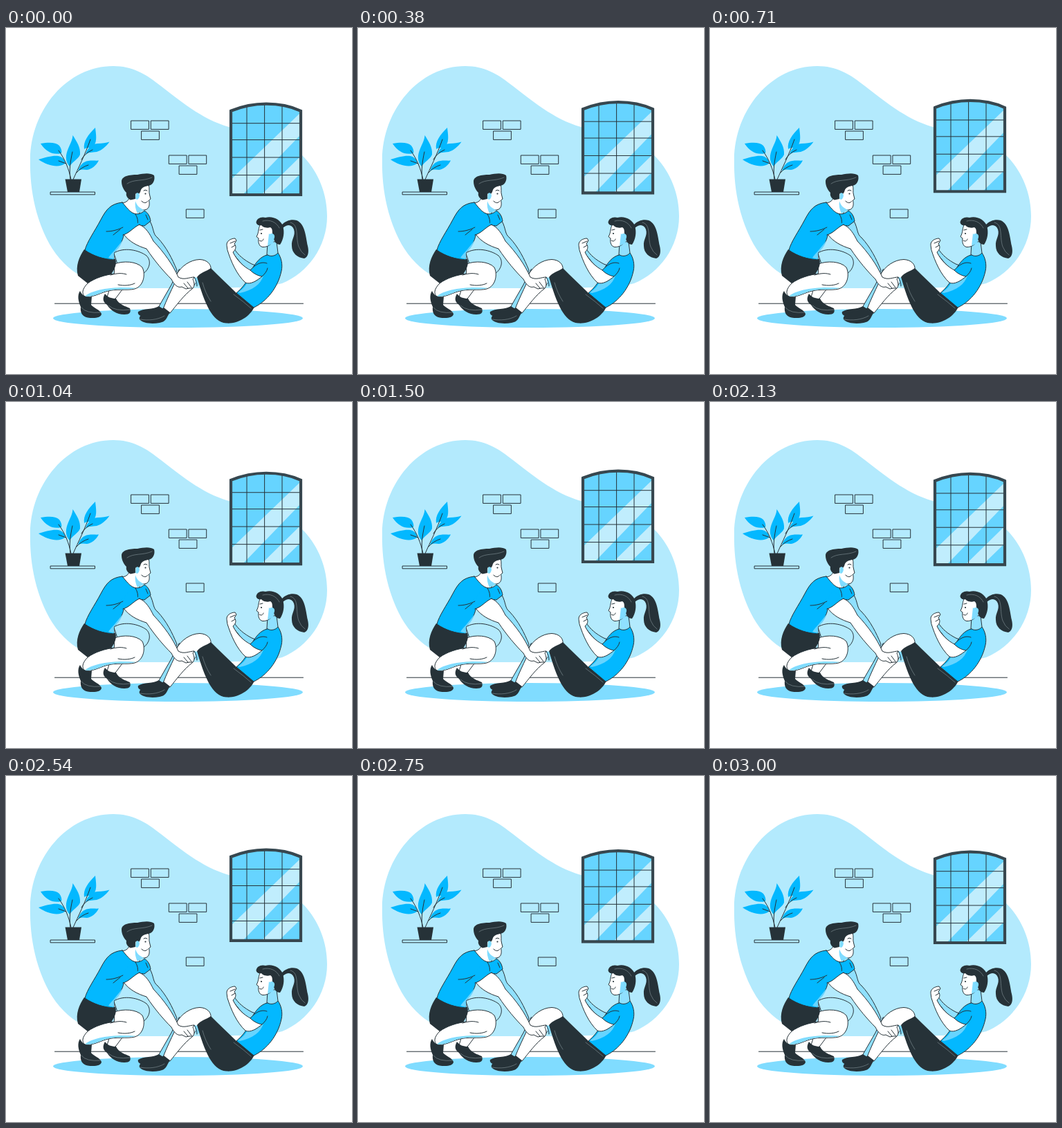
An HTML page that plays this animation: 500 px wide and 500 px high, repeating every 3040 ms.

```html
<!DOCTYPE html>
<html lang="en">
<head>
<meta charset="utf-8">
<title>Sit-up training</title>
<style>
html, body { margin: 0; width: 100%; height: 100%; overflow: hidden; background: #fff; }
svg { display: block; width: 100vw; height: 100vh; }
.line { fill: none; stroke: #263238; stroke-width: 1; stroke-linecap: round; stroke-linejoin: round; }
.dark { fill: #263238; }
.blue { fill: #03b8ff; }
.pale { fill: #b3eafd; }
.mid { fill: #80dcff; }
.fold { fill: #66d4ff; }
.skin, .shade, .tee { stroke: #263238; stroke-width: 1; stroke-linejoin: round; stroke-linecap: round; }
.skin { fill: #fff; }
.shade { fill: #8fe0ff; }
.tee { fill: #03b8ff; }
.seam { fill: none; stroke: #87959b; stroke-width: .6; stroke-linecap: round; }
</style>
</head>
<body>
<svg viewBox="0 0 500 500">
  <defs>
    <path id="pane" d="M325 119.8C343 112.5 358 109.7 376 109.7S410 112.5 426 119.8V241H325Z"/>
    <clipPath id="glass"><use href="#pane"/></clipPath>
  </defs>

  <path class="pale" d="M35 190C36 117 89 55 155 55C182 55 201 66 220 81C250 104 283 132 322 143C365 152 405 160 430 186C452 209 464 240 464 272C464 316 436 354 399 369C368 377 270 376 184 376C134 376 94 360 67 319C44 282 34 235 35 190Z"/>
  <ellipse class="mid" cx="248.5" cy="419.5" rx="180.5" ry="13.5"/>
  <path class="line" d="M70.5 398.2H429.5"/>
  <g id="bricks" class="line"></g>

  <g id="window">
    <g clip-path="url(#glass)">
      <use href="#pane" fill="#66d4ff"/>
      <path fill="#c0edfd" d="M325 219L427 121V153L342 241H325ZM369 241L427 184V209L394 241Z"/>
      <path class="line" d="M348 110V241M373.6 108V241M399 110V241M325 137.7H426M325 161.6H426M325 187H426M325 212.6H426"/>
    </g>
    <use href="#pane" fill="none" stroke="#37474f" stroke-width="4.2"/>
  </g>

  <!-- shelf and plant -->
  <path class="line" d="M64.5 237H128.5V240.8H64.5Z"/>
  <path class="blue" d="M80 181C68 184 58 179 50 167C62 165 72 165 77 170C80 174 81 178 80 181ZM85 196C77 202 61 200 47 190C60 186 72 183 79 186C84 189 86 193 85 196ZM92 200C85 193 86 183 90 174C93 167 96 162 96.5 155C102 164 108 172 107 183C104 190 97 192 92 200ZM113 175C111 164 119 154 129 144C130 154 132 163 127 170C123 174 117 172 113 175ZM115 183C117 174 124 168 132 167C139 167 145 166 149.500 164.500C144 172 138 177 131 179C124 180 119 179 115 183ZM104 207C106 199 111 193 119 192C125 191 130 192 134 191.500C130 199 124 204 117 205C111 204 107 204 104 207Z"/>
  <path class="line" d="M94 219C91 204 85 189 76 177M87 196L76 192M93 219C91 205 93 193 96 179M97 219C104 203 114 184 122 161M109 190Q114 181 125 176M102 209Q109 201 119 198"/>
  <path class="dark" d="M85.500 218.500H109L106 237H89Z"/>

  <!-- trainer, far side -->
  <path class="shade" style="fill:#b3eafd" d="M156 325C171 316 192 321 203 329C211 337 207 349 198 355L166 354Z"/>
  <path class="skin" d="M150 376L146 389C151 394 156 393 159 390L168 378Z"/>
  <path class="dark" d="M143 384C139 391 140 396 146 400C151 408 160 414 171 414C179 414 181 411 179 405C173 402 163 400 159 391C152 391 147 389 143 384Z"/>
  <path class="shade" d="M193 284L208 279C214 290 212 298 219 303C232 317 240 333 247 350L241 363C231 338 211 315 197 301Z"/>

  <!-- far leg of the athlete -->
  <path class="shade" d="M250 349L239 371L220 404L229 409L260 353Z"/>
  <path class="dark" d="M191 410C198 405 213 407 221 402L232 409L226 418L199 417C192 416 190 413 191 410Z"/>

  <!-- trainer, near side -->
  <path class="skin" d="M157 341C169 336 189 337 197 346C202 356 199 373 186 377C175 380 159 376 144 381C134 384 124 390 114 388C109 384 110 377 118 369C129 361 143 357 156 355Z"/>
  <path class="mid" d="M114 387.500C124 379 150 373 188 375.500C175 379.500 159 375.500 144 380.500C134 383.500 124 389.500 114 387.500Z"/>
  <path class="dark" d="M113 320L158 334C161 341 156 350 152 356C138 358 126 363 118 369L104 358C100 344 106 330 113 320Z"/>
  <path class="line" d="M151 357C161 354 168 354 174 356M162 371C171 373 180 372 186 369"/>
  <path class="dark" d="M107 380C103 386 104 394 108 403C107 411 110 417 118 418.500C127 420 138 419 138 413C136 407 127 405 123 400L124 388C117 390 111 388 107 380Z"/>
  <path class="seam" d="M109 404Q116 413 137 411M148 401Q158 410 179 407"/>

  <path class="skin" d="M178 244C178 249 174 252 168 253L179 268L192 270L196 257Z"/>
  <path class="skin" d="M187 230L206 226C208 232 206 237 207.500 241L209 247L206.500 249C208 255 207 261 202 262.500C196 264 190 262 187 258Z"/>
  <path class="skin" style="stroke:none" d="M180 246L190 246L193 261L186 264L178 256Z"/>
  <path class="mid" d="M187 250C189 257 194 261 200 263L190 268C187 262 186 256 187 250Z"/>
  <path class="dark" d="M167 222C167 214 178 212 190 212C199 210 209 209 214 213C216 220 212 227 206 228C201 229 196 229 194 237L192 240C188 237 185 240 187 247L180 248.500C175 246 173 242 174 238C170 234 167 228 167 222Z"/>
  <path class="mid" d="M188 239C193 236 195 244 190 248L187 247Z"/>
  <path class="seam" d="M175 225C185 218 197 222 211 216"/>
  <path class="line" d="M199 235Q201 233 204 235M196 250C199 254 203 253 205 250"/>
  <circle class="dark" cx="201.500" cy="239.500" r="1.1"/>

  <path class="tee" d="M168 252C151 254 145 262 137 277C128 294 117 309 114 321C127 330 141 334 156 335V325C163 316 169 308 170 299L192 285L200 286L209 279C208 272 205 267 200 264C196 268 190 270 185 268C179 266 174 259 168 252Z"/>
  <path class="fold" d="M148 332C153 325 161 317 168 307C166 316 160 321 156 325V334Z"/>
  <path class="line" d="M145 294C153 294 161 292 169 288M155 299L165 291M187 269Q192 277 190 284M202 270L205 277"/>

  <!-- athlete, legs -->
  <path class="skin" d="M246 357C253 344 266 335 280 334.500C291 335 297 342 296 349L278 361L269 377C257 386 247 400 237 412C232 412 229 409 227 406C232 393 238 381 244 368Z"/>
  <path class="mid" d="M272 360L277 361L279 371L275 374Z"/>
  <path class="dark" d="M276 360C281 353 289 352 296 347C309 360 321 371 333 383L359 403C352 418 334 428 318 426.500C298 425 287 398 276 360Z"/>
  <path class="dark" d="M198 414C206 409 218 411 228 404L237 411C232 417 233 424 222 426C211 428 198 427 193 421C192 418 194 415 198 414Z"/>
  <path class="seam" d="M194 421C205 423 219 422 229 416M329 385Q344 396 354 405M284 368Q288 383 296 395"/>

  <!-- trainer, near arm -->
  <path class="skin" d="M170 298C178 309 190 315 203 319C215 337 228 352 239 363C243 371 248 376 254 374L260 377L265 376L270 376C273 373 272 367 270 363L272 360C265 360 257 365 249 360C241 342 229 325 213 308C208 298 202 287 192 284Z"/>
  <path class="line" d="M257 369L263 376M262 367L268 375M272 360C275 365 276 369 276 373"/>
  <path class="tee" style="stroke:none" d="M179 273C170 280 168 290 169 299C178 297 184 288 193 284Z"/>
  <path class="line" d="M169 299C178 297 184 288 193 284"/>

  <!-- athlete, upper body -->
  <path class="shade" d="M329 318C336 329 344 335 355 341L366 345L354 353C343 345 334 334 327 324Z"/>
  <path class="tee" d="M377 328L393 325C398 332 400 342 398 351C393 375 377 395 358 404L333 383C340 377 346 370 351 361L355 349C362 338 367 331 377 328Z"/>
  <path class="fold" d="M349 367C358 368 366 363 372 358C368 370 357 379 338 383L335 382C342 378 346 373 349 367Z"/>
  <path class="skin" d="M319 314C318 308 325 304 331 304L333 307L330 312C334 317 331 321 328 324C334 336 343 345 355 351L371 358C362 366 353 371 346 368C333 356 325 337 320 321Z"/>
  <path class="line" d="M324 311L331 308M326 317L331 314"/>
  <path class="tee" d="M377 340C369 337 361 341 353 350C358 355 364 358 370 359C374 355 377 352 378 347"/>

  <path class="shade" d="M378 310L377 327C381 331 389 330 393 325L391 309Z"/>
  <path class="skin" d="M368 283C364 289 366 295 362 301.500L365 304C364 310 366 316 371 316.500C377 317 384 313 387 306L386 287Z"/>
  <path class="mid" d="M380 297L388 304L386 311L378 315Z"/>
  <path class="dark" d="M361.500 281C362 275 369 272 375 274C385 271 397 277 400 286C403 295 401 306 396 313C391 313 387 309 387 302C383 297 387 291 382 288C376 290 370 287 369 285C365 286 362 284 361.500 281Z"/>
  <path class="mid" d="M381 302C379 297 386 295 388 300C389 305 384 309 382 306Z"/>
  <path class="dark" d="M398 285C404 278 413 276 420 278C432 283 433 300 436 315C438 323 437 331 431 333C421 332 413 325 413 315C412 305 419 300 416 291C413 284 407 283 400 289Z"/>
  <path class="seam" d="M411 281C424 284 418 302 423 316Q426 324 432 328M371 279C382 276 391 281 395 289"/>
  <path class="line" d="M367 292L371 291M366 307C369 309 371 308 372 305"/>
  <circle class="dark" cx="369" cy="297" r="1.1"/>
</svg>
<script>
const LOOP = 3040, PEAK = 1500, RISE = 10;
const NS = "http://www.w3.org/2000/svg";

const bricks = document.getElementById("bricks");
for (const [x, y] of [[181, 134], [209.7, 134], [196, 149], [235.7, 184], [264.3, 184], [250.5, 199], [260.7, 262]]) {
  const brick = document.createElementNS(NS, "rect");
  Object.entries({ x, y, width: 25.4, height: 12.4 }).forEach(([k, v]) => brick.setAttribute(k, v));
  bricks.append(brick);
}

const pane = document.getElementById("window");
const start = performance.now();

// The window rises at a steady speed, then sinks back.
function draw(now) {
  const t = Math.max(0, now - start) % LOOP;
  const lift = RISE * Math.max(0, 1 - Math.abs(t - PEAK) / PEAK);
  pane.setAttribute("transform", `translate(0 ${-lift})`);
  requestAnimationFrame(draw);
}
draw(start);
</script>
</body>
</html>
```
